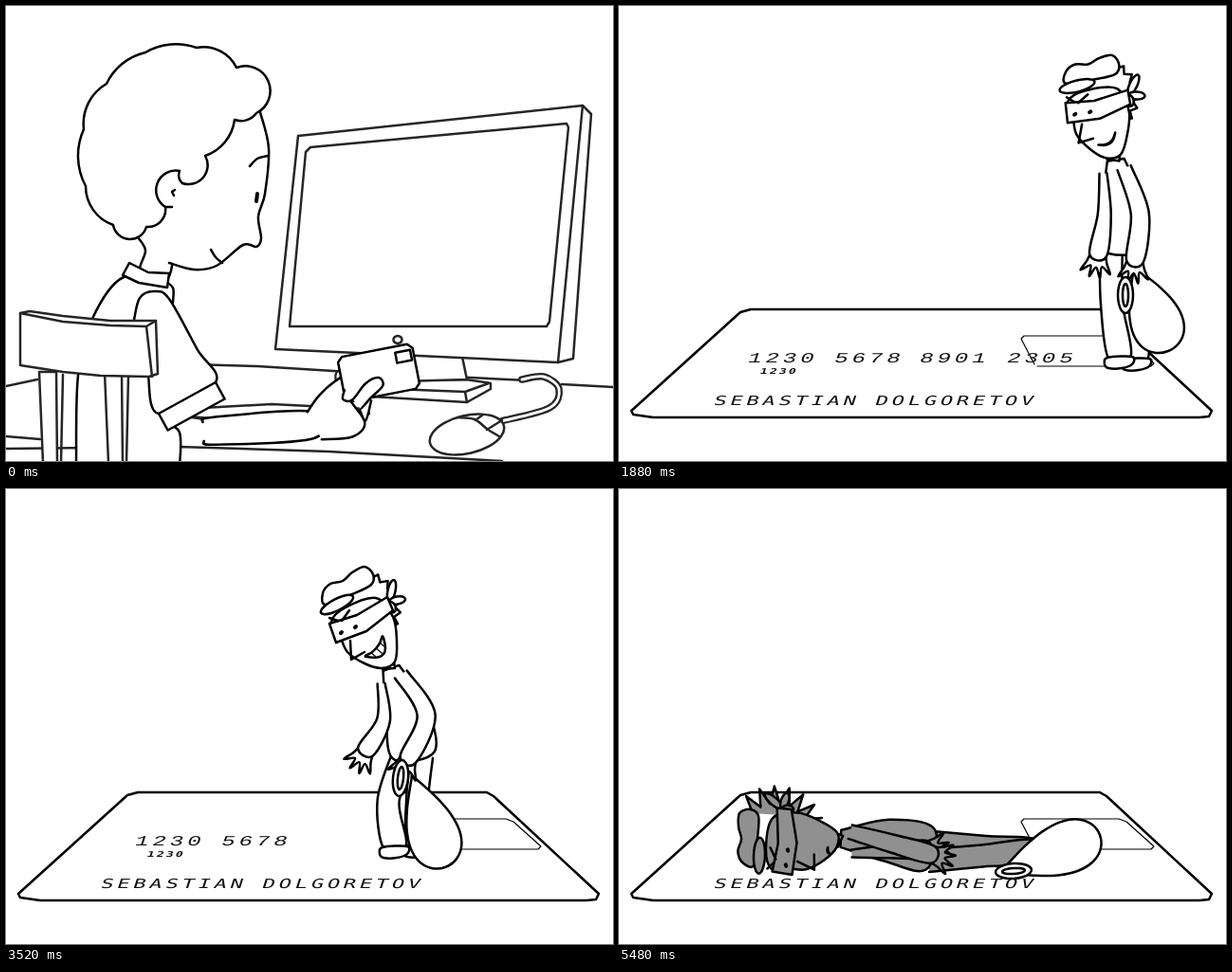
An HTML page for the animation above (5800 ms loop, 640 px wide and 480 px high).

```html
<!DOCTYPE html>
<html lang="en">
<head>
<meta charset="utf-8">
<title>Card thief</title>
<style>
html, body { margin: 0; width: 100%; height: 100%; overflow: hidden; background: #fff; }
svg { display: block; width: 100vw; height: 100vh; }
path { stroke: #000; stroke-width: 2.5; stroke-linejoin: round; stroke-linecap: round; }
#room path, #chair path { stroke: #262626; }
path.line { fill: none; }
path.thin { fill: none; stroke-width: 1.2; }
path.bold { stroke-width: 4; }
text { font: 22px "DejaVu Sans Mono", monospace; letter-spacing: 3.8px; fill: #111; }
.num { font-family: "Liberation Mono", monospace; font-size: 24px; letter-spacing: 3.9px; }
.small { font-size: 13px; letter-spacing: 2.2px; font-weight: bold; }
</style>
</head>
<body>
<svg viewBox="0 0 640 480" fill="#fff">
  <g id="desk">
    <g id="room"></g>
    <g id="head"></g>
    <g id="body"></g>
    <g id="arm"></g>
    <g id="chair"></g>
  </g>
  <g id="card">
    <g id="plate"></g>
    <text class="num" transform="matrix(1 0 -.2 .62 135 376)">1230</text>
    <text class="num" transform="matrix(1 0 -.2 .62 226 376)">5678</text>
    <text class="num" id="third" transform="matrix(1 0 -.2 .62 316 376)">8901</text>
    <text class="num" id="fourth" transform="matrix(1 0 -.2 .62 408 376)">2305</text>
    <text class="small" transform="matrix(1 0 -.2 .62 148 388)">1230</text>
    <text transform="matrix(1 0 -.2 .62 99 421)">SEBASTIAN DOLGORETOV</text>
    <g id="legs"></g>
    <g id="bag"></g>
    <g id="upper"></g>
    <g id="loop"></g>
  </g>
</svg>
<script>
const LOOP = 5800, TICK = 40, RAD = Math.PI / 180;
const $ = id => document.getElementById(id);
const show = (id, on) => $(id).style.display = on ? '' : 'none';

// ---- geometry
const mix = (a, b, k) => typeof a === 'number' ? a + (b - a) * k
  : Array.isArray(a) ? a.map((v, i) => mix(v, b[i], k))
  : Object.fromEntries(Object.keys(a).map(n => [n, mix(a[n], b[n], k)]));
const span = (n, f) => Array.from({ length: n }, (_, i) => f(i, i / (n - 1)));
const polar = (r, deg) => [r * Math.cos(deg * RAD), r * Math.sin(deg * RAD)];
const place = (pts, [ox, oy], deg = 0) => {
  const [c, s] = polar(1, deg);
  return pts.map(([x, y]) => [ox + x * c - y * s, oy + x * s + y * c]);
};
const aim = (a, b) => Math.atan2(b[1] - a[1], b[0] - a[0]) / RAD;
const gap = (a, b) => Math.hypot(b[0] - a[0], b[1] - a[1]);
const ring = (at, rx, ry, deg = 0) =>
  place(span(12, i => [rx * Math.cos(i * 30 * RAD), ry * Math.sin(i * 30 * RAD)]), at, deg);
const box = (w, h, r) => [[-w + r, -h], [w - r, -h], [w, -h + r], [w, h - r], [w - r, h], [r - w, h], [-w, h - r], [-w, r - h]];

// ---- path strings
const poly = pts => 'M' + pts.join('L') + 'Z';
const line = (...pts) => 'M' + pts.join('L');
function curve(pts, closed) {
  const n = pts.length;
  const at = i => pts[closed ? (i + n) % n : Math.max(0, Math.min(n - 1, i))];
  let d = 'M' + pts[0];
  for (let i = 0; i < (closed ? n : n - 1); i++) {
    const [a, b, c, e] = [at(i - 1), at(i), at(i + 1), at(i + 2)];
    d += 'C' + b.map((v, k) => v + (c[k] - a[k]) / 6) + ' ' + c.map((v, k) => v - (e[k] - b[k]) / 6) + ' ' + c;
  }
  return d + (closed ? 'Z' : '');
}
const loop = pts => curve(pts, true);

// arcs through [x, y, height of the bulge before this point]
function scallop(list) {
  let d = '', prev = list[list.length - 1];
  for (const p of list) {
    const chord = gap(prev, p), h = Math.abs(p[2]) || .1, r = (chord * chord / 4 + h * h) / (2 * h);
    d += (d ? '' : `M${prev[0]},${prev[1]}`) + `A${r} ${r} 0 ${+(h > chord / 2)} ${+(p[2] > 0)} ${p[0]},${p[1]}`;
    prev = p;
  }
  return d;
}

// outline of a limb of changing width, open at its root
function limb(joints, widths) {
  const side = sign => joints.map((p, i) => {
    const deg = aim(joints[Math.max(0, i - 1)], joints[Math.min(joints.length - 1, i + 1)]);
    return place([[0, sign * widths[i] / 2]], p, deg)[0];
  });
  return curve([...side(1), ...side(-1).reverse()]);
}
const bent = (a, [x, y, bend]) => [a, place([[0, bend]], mix(a, [x, y], .5), aim(a, [x, y]))[0], [x, y]];

function add(id, d, cls = '') {
  const el = document.createElementNS('http://www.w3.org/2000/svg', 'path');
  el.setAttribute('d', d);
  el.setAttribute('class', cls);
  $(id).append(el);
  return el;
}
const part = (id, make, cls) => ({ el: add(id, '', cls), make });
const pose = (parts, p) => parts.forEach(({ el, make }) => el.setAttribute('d', make(p)));

// ---- desk
function cord(pts, w) {
  add('room', curve(pts), 'line').style.strokeWidth = w;
  add('room', curve(pts), 'line').style.cssText = `stroke:#fff;stroke-width:${w - 4.6}`;
}
add('room', line([0, 401], [33, 394]) + line([586, 399], [640, 402]) + line([160, 377], [265, 380], [345, 385], [550, 395]), 'line');
add('room', line([0, 454], [36, 457]) + line([0, 467], [182, 465], [340, 470], [523, 480]), 'line');
cord([[344, 420], [352, 404], [351, 388], [370, 383]], 8);
add('room', poly([[182, 432], [190, 425], [280, 420], [380, 425], [383, 430], [326, 453]]));
add('room', line([183, 432], [323, 445], [380, 425]) + line([323, 445], [326, 453]), 'line');
add('room', poly([[384, 403], [420, 395], [485, 394], [511, 398], [511, 404], [486, 418], [385, 412]]));
add('room', line([384, 403], [484, 407], [509, 398]) + line([484, 407], [486, 418]), 'line');
add('room', poly([[421, 368], [417, 396], [486, 394], [481, 370]]));
add('room', poly([[308, 137], [608, 105], [617, 114], [598, 372], [582, 376], [284, 362]]));
add('room', line([608, 105], [582, 376]), 'line');
add('room', poly([[316, 154], [321, 149], [591, 124], [593, 128], [573, 333], [570, 338], [299, 338]]));
add('room', loop(ring([413, 352], 4.5, 4)));
cord([[522, 438], [573, 424], [583, 404], [567, 391], [544, 394]], 7.5);
add('room', loop(ring([486, 452], 40, 20, -13)));
add('room', curve([[476, 434], [494, 436], [507, 446], [520, 454]]) + line([495, 437], [503, 431]) + line([507, 447], [523, 437]), 'line');

for (const x of [35, 104]) {
  add('chair', poly([[x, 386], [x + 4, 482], [x + 19, 482], [x + 18, 386]]));
  add('chair', line([x + 25, 389], [x + 23, 482]));
}
add('chair', poly([[15, 324], [25, 322], [60, 327], [110, 332], [158, 332], [160, 388], [151, 391], [100, 390], [60, 386], [15, 379]]));
add('chair', line([15, 324], [60, 333], [110, 337], [148, 338], [158, 332]) + line([148, 338], [154, 391]), 'line');

// ---- boy
add('head', curve([[139, 244], [147, 258], [141, 278], [150, 290], [170, 288], [176, 269]]));
add('head', curve([[268, 112], [277, 150], [273, 198], [266, 222], [269, 245], [264, 254], [250, 252], [222, 274], [198, 278], [172, 271]]));
add('head', scallop([[147, 49, 6], [201, 44, 6], [243, 65, 8], [264, 113, 25], [241, 120, 4], [210, 158, 7], [186, 187, 13],
  [183, 174, 2], [168, 212, -17], [148, 233, 7], [113, 231, 14], [84, 190, 8], [82, 130, 7], [106, 82, 8]]));
add('head', line([168, 212], [175, 212]) + line([178, 194], [175, 196], [177, 200]), 'line');
add('head', curve([[257, 169], [265, 161], [276, 158]]) + curve([[216, 257], [221, 265], [228, 271]]), 'line');
add('head', line([265, 198], [264, 206]), 'bold');
add('body', curve([[74, 482], [76, 390], [91, 330], [124, 286], [170, 292], [176, 312], [165, 360], [165, 430], [183, 450], [183, 486]]));
add('body', poly([[130, 271], [123, 284], [140, 292], [170, 297], [172, 282], [150, 281]]));

const low = { lean: 0, cuff: [[221, 397], [161, 430]], elbow: [208, 449], wrist: [324, 442], hand: 29, card: [393, 387, -11] };
const raised = { lean: 1, cuff: [[237, 363], [189, 420]], elbow: [258, 412], wrist: [350, 329], hand: 0, card: [397, 246, -32] };
const reach = { ...raised, elbow: [265, 411], wrist: [436, 321], card: [483, 238, -32] };

const armpit = [150, 391], shoulder = [[135, 331], [141, 308], [156, 301], [172, 309]];
const inHand = (pts, p) => curve(place(pts, p.wrist, p.hand));
const boy = [
  part('arm', p => limb([p.elbow, mix(p.elbow, p.wrist, .1), p.wrist], [20, 29, 28])),
  part('arm', p => curve([...shoulder, mix(shoulder[3], p.cuff[0], .6), ...p.cuff, armpit])),
  part('arm', ({ cuff: [a, b] }) => {
    const outer = place([[0, 20], [gap(a, b), 20]], b, aim(b, a));
    return poly([a, b, ...outer]);
  }),
  part('arm', p => inHand([[-12, -9], [-10, -29], [-2, -52], [8, -65], [18, -44], [46, -29], [42, -9], [15, 9]], p)),
  part('arm', p => poly(place(box(40, 24, 5), p.card, p.card[2]))),
  part('arm', p => poly(place(box(8, 5.5, 0).map(([x, y]) => [x + 29, y - 12]), p.card, p.card[2]))),
  part('arm', p => inHand([[11, -48], [14, -39], [23, -43], [27, -65], [36, -77], [44, -72], [39, -54], [36, -39]], p)),
  part('arm', p => inHand([[41, -52], [46, -31], [36, -37]], p))
];

// ---- bank card
add('plate', poly([[128, 323], [139, 320], [507, 320], [514, 324], [625, 427], [622, 433], [612, 434], [36, 434], [15, 431], [13, 427]]));
add('plate', line([438, 378], [424, 351], [427, 348], [527, 348], [535, 351], [564, 377], [561, 380], [441, 380]), 'thin');

// ---- thief: limbs are [end x, end y, bend]; mouth is [x, y, half width, inner sag, outer sag]
const stand = {
  neck: [521, 160], hip: [531, 257], tilt: 13, far: [505, 263, -4], near: [544, 269, -11],
  a: [528, 370, 4], b: [546, 372, 0], tip: [543, 275], end: [579, 364], strap: [534, 305, 0],
  mouth: [-11, -18, 11, 5, 6], spike: 6
};
const crouch = {
  neck: [484, 208], hip: [511, 296], tilt: -4, far: [452, 308, -8], near: [515, 306, -17],
  a: [498, 373, 33], b: [499, 372, 20], tip: [513, 312], end: [544, 400], strap: [504, 339, 6],
  mouth: [-16, -16, 13, 6, 8], spike: 6
};
const risen = {
  neck: [403, 187], hip: [430, 281], tilt: 0, far: [379, 277, -11], near: [424, 285, -23],
  a: [410, 377, 11], b: [435, 376, 3], tip: [428, 302], end: [463, 399], strap: [416, 305, 6],
  mouth: [-15, -21, 14, 3, 13], spike: 6
};
const droop = {
  neck: [404, 189], hip: [428, 283], tilt: 1, far: [389, 282, -5], near: [423, 285, -19],
  a: [408, 376, 9], b: [440, 372, 4], tip: [402, 404], end: [507, 365], strap: [416, 403, 86],
  mouth: [-14, -3, 4, -1, -2], spike: 18
};
const lying = {
  ...droop, neck: [231, 371], hip: [328, 380], tilt: -61, far: [325, 380, 0], near: [331, 386, 0],
  a: [440, 382, 0], b: [440, 382, 0]
};
const spots = ['neck', 'hip', 'far', 'near', 'a', 'b', 'tip', 'end', 'strap'];
const moved = (p, names, f) => ({ ...p, ...Object.fromEntries(names.map(n => [n, [...f(p[n]), ...p[n].slice(2)]])) });
const crouchLeft = moved(crouch, spots, ([x, y]) => [x - 90, y]);

function fallen(k) {
  const deg = -78 * k, pivot = [415, 385];
  const p = moved(droop, spots.slice(0, 6), ([x, y]) => place([[x - pivot[0], y - pivot[1]]], pivot, deg)[0]);
  return mix({ ...p, tilt: p.tilt + deg }, lying, k ** 4);
}

// joints hang on the spine and turn with it
const onSpine = (p, from, offset) => place([offset], p[from], aim(p.neck, p.hip) - 76)[0];
const arms = {
  far: p => bent(onSpine(p, 'neck', [-8, 18]), p.far),
  near: p => bent(onSpine(p, 'neck', [13, 9]), p.near)
};
const leg = (p, name, x) => limb(bent(onSpine(p, 'hip', [x, 2]), p[name]), [24, 23, 24]);
const shoe = at => loop(place([[-13, 1], [-16, 8], [-12, 12], [2, 12], [13, 8], [13, 0]], at));
function hand([, elbow, wrist]) {
  const fan = span(9, (i, u) => polar(i % 2 ? 24 : 13, 55 - 110 * u));
  return curve(place([[-2, 8], ...fan, [-2, -8]], wrist, aim(elbow, wrist)));
}
function sack({ tip, end }) {
  const size = gap(tip, end);
  const drop = span(16, i => {
    const q = i * Math.PI / 8;
    return [size * (1 - Math.cos(q)) / 2, 37 * Math.sin(q) * Math.sin(q / 2) ** 1.2];
  });
  return loop(place(drop, tip, aim(tip, end)));
}
function torso(p) {
  const top = onSpine(p, 'neck', [3, 2]), mid = onSpine({ ...p, mid: mix(top, p.hip, .5) }, 'mid', [4, 0]);
  return limb([top, mid, p.hip], [18, 44, 44]) + 'Z';
}
const mouthAt = ([x, y, half, inner, outer], u, v) =>
  place([[half * u, mix(inner, outer, v) * (1 - u * u)]], [x, y], -49)[0];

const onHead = (make, cls) => part('upper', p => make(pts => place(pts, p.neck, p.tilt), p), cls);
const petal = tip => ring(mix([1, -68], tip, .5), gap([1, -68], tip) / 2, 4, aim([1, -68], tip));
const crook = [
  part('legs', p => leg(p, 'b', 8)),
  part('legs', p => shoe(p.b)),
  part('legs', p => leg(p, 'a', -12)),
  part('legs', p => shoe(p.a)),
  part('bag', sack),
  part('upper', torso),
  ...['far', 'near'].flatMap(n => [
    part('upper', p => hand(arms[n](p))),
    part('upper', p => limb(arms[n](p), n === 'far' ? [8, 14, 18] : [15, 19, 18]))
  ]),
  onHead(at => poly(at([[-14, -8], [-6, 3], [7, 2], [5, -12]]))),
  onHead((at, p) => line(...at(place(span(14, (i, u) => polar(34 + (i % 2) * p.spike, -75 + 115 * u)), [-27, -60])))),
  onHead(at => loop(at([[-60, -47], [-51, -32], [-43, -15], [-25, -3], [-7, 2], [7, -5], [9, -27], [5, -52], [-13, -72], [-45, -62]]))),
  ...[[6, -91], [18, -71], [6, -57]].map(tip => onHead(at => loop(at(petal(tip))))),
  onHead(at => poly(at([[-62, -45], [-33, -54], [-1, -73], [5, -59], [-23, -37], [-55, -25]]))),
  onHead(at => loop(at([[-66, -65], [-69, -77], [-61, -87], [-48, -90], [-38, -99], [-25, -105], [-16, -97], [-18, -86], [-38, -76]]))),
  onHead(at => loop(at(ring([-54, -65], 19, 6, -27)))),
  onHead(at => line(...at([[-62, -51], [-53, -48]])) + line(...at([[-49, -48], [-41, -59]])) +
    line(...at([[-40, -27], [-39, -7], [-25, -15]])), 'line'),
  onHead(at => line(...at([[-50, -35], [-49, -36]])) + line(...at([[-35, -41], [-34, -42]])), 'bold'),
  onHead((at, { mouth }) => loop(at([[-1, 0], [-.5, 0], [0, 0], [.5, 0], [1, 0], [.5, 1], [0, 1], [-.5, 1]].map(([u, v]) => mouthAt(mouth, u, v))))),
  onHead((at, { mouth }) => [-.5, 0, .5].map(u => line(...at([mouthAt(mouth, u, 0), mouthAt(mouth, u, 1)]))).join(''), 'thin'),
  part('loop', p => loop(ring(p.strap, 8, 19, p.strap[2]))),
  part('loop', p => loop(ring(p.strap, 3, 12, p.strap[2])), 'line')
];

// ---- time
const boyKeys = [[120, low], [440, raised], [680, raised], [960, reach]];
const thiefKeys = [[1880, stand], [2360, crouch], [2520, crouch], [3080, crouchLeft],
  [3160, crouchLeft], [3520, risen], [3960, risen], [4520, droop]];

function keyed(keys, t) {
  const i = keys.findIndex(k => t < k[0]);
  if (i < 1) return keys[i < 0 ? keys.length - 1 : 0][1];
  const [t0, a] = keys[i - 1], [t1, b] = keys[i], u = (t - t0) / (t1 - t0);
  return mix(a, b, u * u * (3 - 2 * u));
}

function frame(now) {
  const t = Math.floor(now % LOOP / TICK) * TICK, atDesk = t < 1480;
  show('desk', atDesk);
  show('card', !atDesk);
  if (atDesk) {
    const p = keyed(boyKeys, t), k = p.lean;
    pose(boy, p);
    $('head').setAttribute('transform', `translate(${-9 * k} ${-6 * k}) rotate(${-5 * k} 150 270)`);
    $('body').setAttribute('transform', `translate(${-2 * k} ${-3 * k})`);
    return;
  }
  const fall = Math.min(1, (t - 4920) / 560);
  pose(crook, fall > 0 ? fallen(fall * fall) : keyed(thiefKeys, t));
  for (const id of ['legs', 'upper']) $(id).setAttribute('fill', t < 4560 ? '#fff' : '#909090');
  show('fourth', t < 2200);
  show('third', t < 2920);
}

const start = performance.now();
function tick() {
  frame(performance.now() - start);
  requestAnimationFrame(tick);
}
tick();
</script>
</body>
</html>
```
